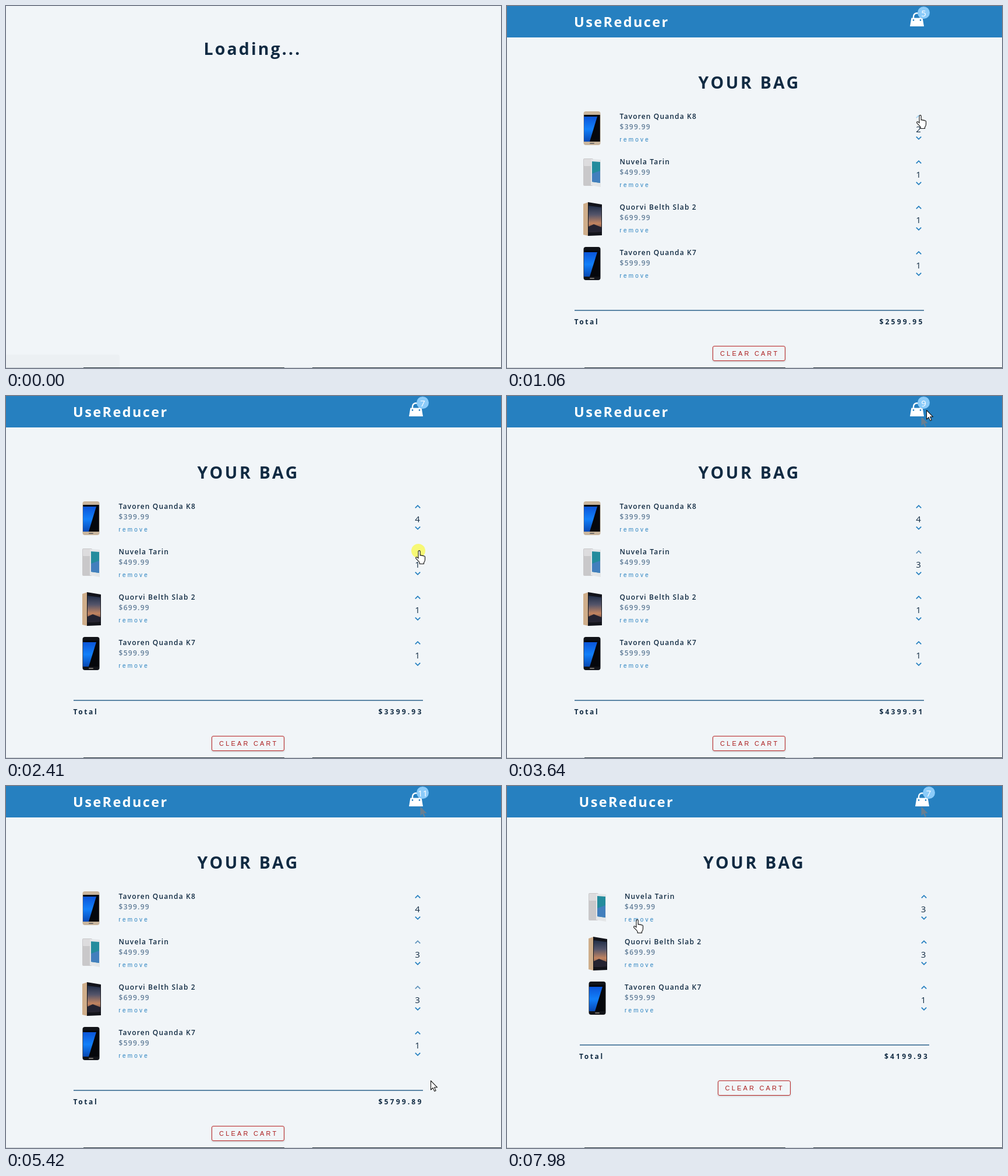
Animation of 850 by 622 pixels, one loop 8000 ms. Source, as an HTML page:

```html
<!DOCTYPE html>
<html lang="en">
<head>
<meta charset="utf-8">
<title>UseReducer cart</title>
<style>
  html, body { margin: 0; width: 100%; height: 100%; overflow: hidden; background: #f1f5f8; }
  body { position: relative; color: #102a42; font-family: "Open Sans", "Noto Sans", sans-serif; }
  #stage { position: absolute; left: 0; top: 0; width: 850px; height: 622px; overflow: hidden; }
  #stage div, #stage span, #stage svg { position: absolute; }
  #stage svg { overflow: visible; }
  #app, #footer, .row { left: 0; top: 0; width: 850px; height: 0; }
  span { line-height: 20px; white-space: pre; }
  #nav { left: 0; top: 0; width: 850px; height: 54px; background: #2680c0; }
  .title { font-size: 28.5px; font-weight: 700; letter-spacing: 3.1px; }
  .heading { letter-spacing: 3.7px; }
  .brand { font-size: 23.5px; font-weight: 700; letter-spacing: 2.4px; color: #fff; }
  .name, .price { font-size: 12px; font-weight: 600; letter-spacing: 1.15px; }
  .price { color: #617d98; letter-spacing: 1.3px; }
  .remove, .clear { font-family: "Liberation Sans", Arial, sans-serif; letter-spacing: 3.2px; }
  .remove { font-size: 10px; color: #2680c0; }
  .clear { font-size: 11px; color: #ab1c1c; }
  .total { font-size: 12px; font-weight: 700; letter-spacing: 2.6px; }
  .sum { letter-spacing: 3.2px; }
  .mid { width: 40px; text-align: center; font-size: 15px; }
  #badge { left: 705px; top: 1px; width: 21px; height: 21px; border-radius: 50%; background: #8bcbf9; }
  .count { color: #fff; }
  #rule { left: 116px; top: 522px; width: 600px; height: 2px; background: #5b85a5; }
  #button { left: 353px; top: 584px; width: 123px; height: 24px; border: 1px solid #bb2525;
    border-radius: 3px; box-shadow: 0 1px 3px rgba(0, 0, 0, .2); }
  #status { left: 0; top: 599px; width: 195px; height: 23px; background: #ecf0f3; border-radius: 0 4px 0 0; }
  #edge { left: 0; top: 621px; width: 850px; height: 1px;
    background: linear-gradient(90deg, #c4cbcf 133px, #26343c 133px 478px, #c4cbcf 478px 526px, #26343c 526px); }
  #spot { left: -12px; top: -12px; width: 24px; height: 24px; border-radius: 50%; background: #f8f85e; opacity: .85; }
</style>
</head>
<body>
<div id="stage"></div>
<script>
const LOOP = 8000, LOADED = 100, REMOVED = 7780, ROW = 78;
const ARROW = 'M.5.5V16l3.6-3.4 2.6 5.8 2.4-1-2.5-5.6h5z';
const HAND = 'M5 14V2.2a1.6 1.6 0 0 1 3.2 0V9q1.6-1 3 .4 1.6-.8 2.7.6 2.4-.5 2.6 1.6v4.6q0 2.6-2 5v2.3H7.2V21Q5 18 1 14.4 .2 12.4 1.6 11.8 3.2 11.6 5 14z';
const BAG = 'M16 6v2h2l2 12H0L2 8h2V6a6 6 0 1 1 12 0zm-2 0a4 4 0 1 0-8 0v2h8V6zM4 10v2h2v-2H4zm10 0v2h2v-2h-2z';
const BLUE = '#2680c0', PALE = '#a9d6f5', DULL = '#5f93bc';

const text = (cls, x, y, str, id = '') =>
  `<span class="${cls}" id="${id}" style="left:${x}px;top:${y - 10}px">${str}</span>`;
const svg = (x, y, body, id = '') =>
  `<svg id="${id}" style="left:${x}px;top:${y}px" width="1" height="1">${body}</svg>`;
const rect = (x, y, w, h, fill, r = 0) =>
  `<rect x="${x}" y="${y}" width="${w}" height="${h}" rx="${r}" fill="${fill}"/>`;
const path = (d, fill, extra = '') => `<path d="${d}" fill="${fill}" ${extra}/>`;
const gradient = (id, ...colors) => `<linearGradient id="${id}" x2="0" y2="1">` +
  colors.map((c, i) => `<stop offset="${i / (colors.length - 1)}" stop-color="${c}"/>`).join('') +
  '</linearGradient>';

// Simplified product pictures, local to a 34 x 60 box
const slab = (frame, top, height) => rect(1.5, top, 29, height, frame, 4) +
  rect(2.2, top + 6, 27.6, height - 12, '#05070c') +
  path(`M2.2 ${top + 9}H25L12 ${top + height - 6}H2.2z`, 'url(#glow)') +
  rect(12, top + height - 4, 8, 2, '#77706a', 1);
const pair = rect(1, 4, 17, 47, '#c9c8ca', 2) + rect(2, 5, 15, 12, '#dddcde', 1) +
  path('M14 5L31 6V53L14 50z', '#e4e6e8') + path('M16 9L30 10V46L16 44z', '#248c9d') +
  path('M16 30L30 25V46L16 44z', '#427fbd');
const tilted = path('M1 4L10 1V59L1 57z', '#cfae8b') + path('M9 1L33 5V58L9 59z', '#12131a') +
  path('M10 7L32 10V52L10 53z', 'url(#dusk)') + path('M10 43L19 39 32 44V52L10 53z', '#242331');

// A burst of clicks on the "up" button belongs to each product
const products = [
  { name: 'Tavoren Quanda K8', price: 399.99, picture: slab('#c9b59c', 1, 58),
    first: 900, gap: 300, count: 3, rest: BLUE },
  { name: 'Nuvela Tarin', price: 499.99, picture: pair, first: 2510, gap: 40, count: 2, rest: DULL },
  { name: 'Quorvi Belth Slab 2', price: 699.99, picture: tilted, first: 4700, gap: 400, count: 2, rest: DULL },
  { name: 'Tavoren Quanda K7', price: 599.99, picture: slab('#111318', 0, 57), count: 0, rest: BLUE }
];
const clickTimes = p => Array.from({ length: p.count }, (_, k) => p.first + k * p.gap);
const allClicks = [...products.flatMap(clickTimes), REMOVED];

const chevron = (y, turn, id = '') => svg(707, y,
  `<path id="${id}" d="M-4.2 2.4L0-1.8 4.2 2.4" fill="none" stroke="${BLUE}" stroke-width="1.8" transform="scale(1 ${turn})"/>`);
const row = (p, i) => `<div class="row" id="row${i}">` +
  svg(130, 180, p.picture) +
  text('name', 193.5, 189.5, p.name) + text('price', 193.5, 207.5, '$' + p.price) +
  text('remove', 193.5, 229.5, 'remove') +
  chevron(190, 1, 'up' + i) + text('mid', 686.5, 210.5, '', 'qty' + i) + chevron(227, -1) + '</div>';

const outline = 'stroke="#111" stroke-width="1.1" stroke-linejoin="round"';
stage.innerHTML = `<svg width="0" height="0"><defs>
    ${gradient('glow', '#0b55d8', '#1280fa', '#0748b4')}
    ${gradient('dusk', '#202d46', '#53546a', '#c28460', '#4a3a41')}</defs></svg>
  <div id="loading">${text('title', 339.5, 72.5, 'Loading...')}<div id="status"></div></div>
  <div id="nav"></div>
  <div id="app">
    ${text('brand', 115, 26.5, 'UseReducer')}
    ${svg(692, 11, path(BAG, '#fff', 'transform="scale(1.2)"'))}
    <div id="badge"></div>${text('mid count', 695.5, 11.5, '', 'count')}
    ${text('title heading', 328.5, 130.5, 'YOUR BAG')}
    ${products.map(row).join('')}
    <div id="footer"><div id="rule"></div>
      ${text('total', 115.5, 542.5, 'Total')}${text('total sum', 639.5, 542.5, '', 'sum')}
      <div id="button"></div>${text('clear', 366, 597, 'CLEAR CART')}</div>
  </div>
  <div id="edge"></div>
  ${svg(711, 34.5, path(ARROW, '#687f91'), 'trace')}
  <div id="cursor"><div id="spot"></div>
    ${svg(0, 0, path(ARROW, '#fff', outline), 'arrow')}
    ${svg(-5, -1, path(HAND, '#fff', outline), 'hand')}</div>`;
const el = id => document.getElementById(id);

// Each move eases from the previous place; bow bends it to the right
const upButton = i => [708, 188 + ROW * i];
const ENTRY = { at: 350, place: [790, 330] };
const PASSED_BAG = 3250;
const moves = [
  { from: ENTRY.at, to: 800, place: upButton(0) },
  { from: 1560, to: 2250, place: upButton(1), bow: 24 },
  { from: 2560, to: PASSED_BAG, place: [711, 35], bow: 46 },
  { from: PASSED_BAG, to: 3400, place: [720, 24] },
  { from: 3680, to: 4180, place: [732, 206] },
  { from: 4280, to: 4600, place: upButton(2) },
  { from: 5110, to: 5400, place: [729, 506], bow: 65 },
  { from: 5480, to: 6690, place: [616, 407] },
  { from: 6790, to: 7010, place: [318, 241] },
  { from: 7110, to: 7450, place: [222, 230] }
];

function pointerAt(t) {
  let [x, y] = ENTRY.place;
  for (const { from, to, place, bow = 0 } of moves) {
    const u = Math.min(1, Math.max(0, (t - from) / (to - from)));
    const ease = u * u * (3 - 2 * u);
    x += (place[0] - x) * ease + bow * Math.sin(Math.PI * ease);
    y += (place[1] - y) * ease;
  }
  return [Math.round(x), Math.round(y)];
}

const show = (id, on) => { el(id).style.visibility = on ? 'inherit' : 'hidden'; };
const near = (a, b, reach) => Math.abs(a - b) <= reach;

function render(t) {
  const loaded = t >= LOADED, removed = t >= REMOVED;
  show('loading', !loaded);
  show('nav', loaded);
  show('app', loaded);
  show('trace', t >= PASSED_BAG);

  const [x, y] = pointerAt(t);
  let pointing = near(x, 218, 25) && near(y, 230, 8);
  let items = 0, total = 0;
  products.forEach((p, i) => {
    const qty = 1 + clickTimes(p).filter(at => t >= at).length;
    const gone = removed && i === 0;
    const hover = near(x, 707, 9) && near(y, 190 + ROW * i, 8);
    const spent = qty > p.count && !removed;
    pointing ||= hover;
    if (!gone) { items += qty; total += qty * p.price; }
    show('row' + i, !gone);
    el('row' + i).style.top = ROW * (i - removed) + 'px';
    el('qty' + i).textContent = qty;
    el('up' + i).setAttribute('stroke', hover ? PALE : spent ? p.rest : BLUE);
  });
  el('count').textContent = items;
  el('sum').textContent = '$' + total.toFixed(2);
  el('footer').style.top = -ROW * removed + 'px';
  // The page is re-centred once its scrollbar disappears
  el('app').style.left = 8.5 * removed + 'px';

  el('cursor').style.left = x + 'px';
  el('cursor').style.top = y + 'px';
  show('cursor', t >= ENTRY.at);
  show('arrow', !pointing);
  show('hand', pointing);
  show('spot', allClicks.some(at => t >= at - 130 && t < at));
}

const start = performance.now();
function tick() {
  render((performance.now() - start) % LOOP);
  requestAnimationFrame(tick);
}
tick();
</script>
</body>
</html>
```
